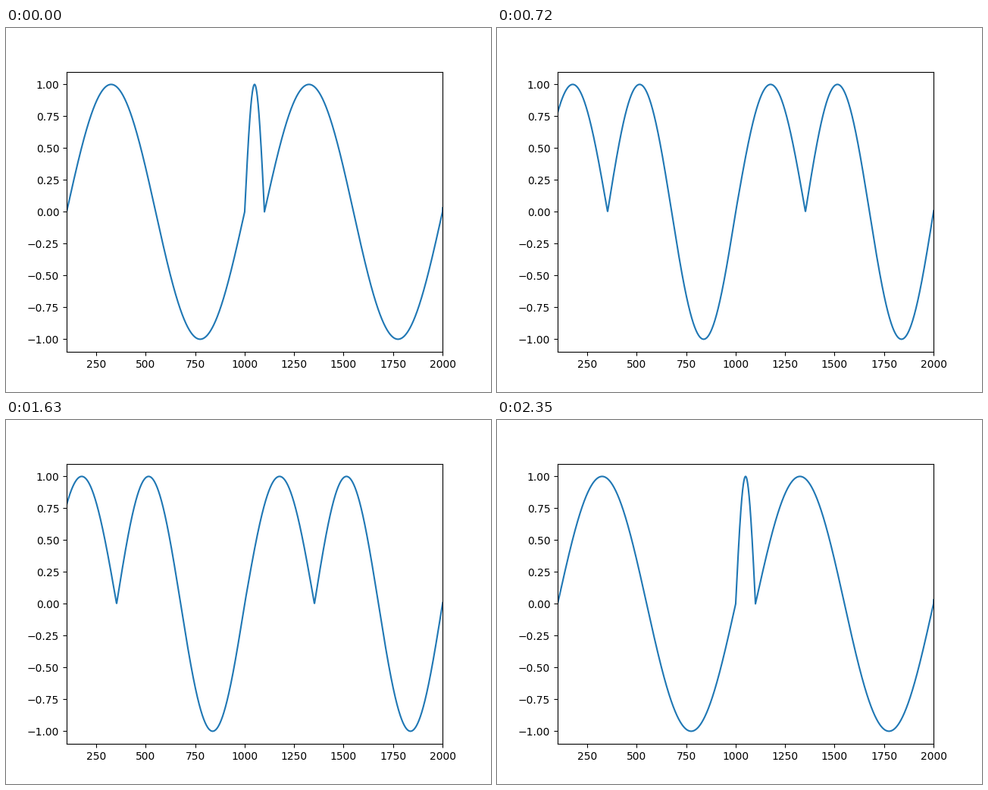
A matplotlib script that plays this animation: 640 by 480 pixels, repeating every 2.41 s.

```python
import numpy as np
import matplotlib.pyplot as plt
from matplotlib.animation import FuncAnimation

LOOP_MS = 2410
TICK_MS = 10
POSE_MS = 60
TURN_END_MS = 1270  # the widest pose is held a little longer before reversing
PERIOD = 1000

widths = np.linspace(100, 500, 20)
sweep = np.concatenate([widths, widths[::-1]])
x = np.arange(0, 2 * PERIOD + 2)


def wave(width):
    """Half a sine over the first `width` units, a full sine over the rest."""
    t = x % PERIOD
    bump = np.sin(np.pi * t / width)
    full = np.sin(2 * np.pi * (t - width) / (PERIOD - width))
    return np.where(t < width, bump, full)


def width_at(ms):
    if ms < TURN_END_MS:
        pose = min(ms // POSE_MS, len(widths))
    else:
        pose = (ms - TICK_MS) // POSE_MS
    return sweep[pose]


fig, ax = plt.subplots(figsize=(6.4, 4.8), dpi=100)
line, = ax.plot(x, wave(widths[0]), color="#1f77b4", lw=1.5)
ax.set_xlim(100, 2000)
ax.set_ylim(-1.1, 1.1)


def update(frame):
    line.set_ydata(wave(width_at(frame * TICK_MS)))
    return line,


anim = FuncAnimation(fig, update, frames=LOOP_MS // TICK_MS,
                     interval=TICK_MS, repeat=True, repeat_delay=0)
plt.show()
```
